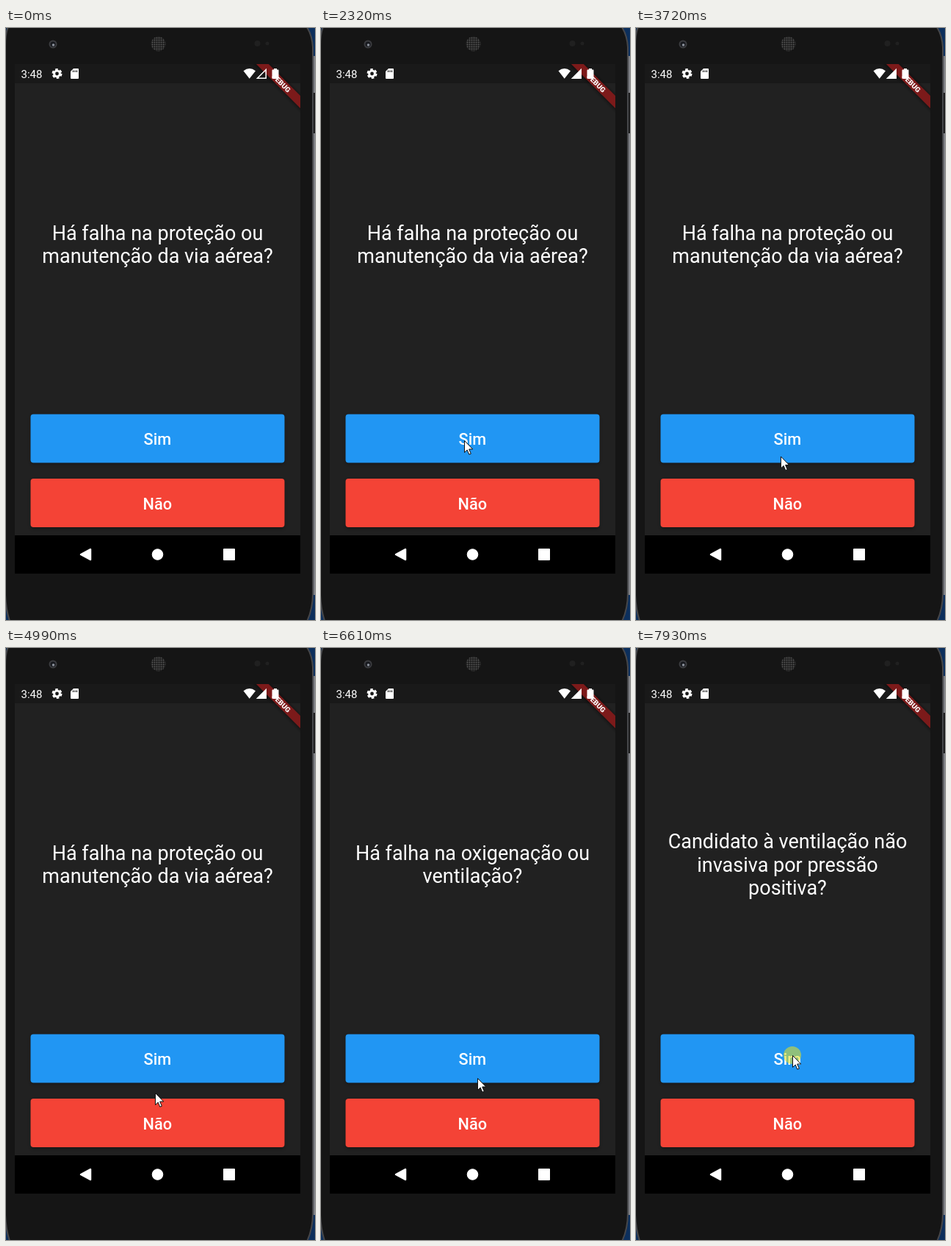
Write an HTML page that moves like this. It is 421x804 px and loops after 8 s.

```html
<!DOCTYPE html>
<html lang="pt">
<head>
<meta charset="utf-8">
<title>Triagem</title>
<style>
  html, body { margin: 0; width: 100%; height: 100%; overflow: hidden; background: #0c2f5c; }
  svg { display: block; width: 421px; height: 804px; }
  text { font-family: Roboto, Inter, sans-serif; fill: #fff; }
  .mid { text-anchor: middle; }
  .ask { font-size: 27px; }
  .label { font-size: 21.7px; font-weight: 500; }
</style>
</head>
<body>
<svg viewBox="0 0 421 804" xmlns="http://www.w3.org/2000/svg">
  <defs>
    <clipPath id="screen"><rect x="12" y="49" width="389" height="692"/></clipPath>
    <clipPath id="noClip"><rect x="34" y="612" width="345" height="66" rx="4"/></clipPath>
    <pattern id="mesh" width="3" height="3" patternUnits="userSpaceOnUse">
      <rect width="3" height="3" fill="#1b1b1b"/><circle cx="1.5" cy="1.5" r="1" fill="#565656"/>
    </pattern>
    <filter id="soft" x="-20%" y="-20%" width="140%" height="150%"><feGaussianBlur stdDeviation="2"/></filter>
  </defs>

  <!-- phone body -->
  <path d="M419 38h2v732h-2z" fill="#7d7f84"/>
  <path d="M418.5 88h2.5v55h-2.5z" fill="#1c1c1e"/>
  <path d="M4 -4Q-1 6 -1 24V770Q0 792 6 808H409Q418 790 418 768V26Q417 8 408 -4Z" fill="#151515" stroke="#46474a" stroke-width="2"/>
  <circle cx="64" cy="22" r="5.5" fill="#3c3d40"/>
  <circle cx="64" cy="22" r="3.6" fill="#17191e"/>
  <circle cx="64.5" cy="23" r="1.8" fill="#8d929c"/>
  <circle cx="207.500" cy="21.500" r="10" fill="url(#mesh)"/>
  <circle cx="342.500" cy="21" r="4" fill="#202020"/>
  <circle cx="356" cy="21" r="2.500" fill="#202020"/>

  <!-- app -->
  <g clip-path="url(#screen)">
    <rect x="12" y="49" width="389" height="692" fill="#212121"/>
    <rect x="12" y="49" width="389" height="26" fill="#191919"/>
    <rect x="12" y="689" width="389" height="52"/>
    <g transform="translate(375.200 74.800) rotate(45)">
      <rect x="-60" y="-6" width="120" height="13" opacity=".5" filter="url(#soft)"/>
      <rect x="-60" y="-6" width="120" height="12" fill="#7c1a1a"/>
      <text class="mid" y="3.500" font-size="9.700" font-weight="900">DEBUG</text>
    </g>
  </g>

  <!-- status icons -->
  <text x="20.500" y="68" font-size="15">3:48</text>
  <g fill="none" stroke="#fff">
    <circle cx="69.500" cy="62" r="3.900" stroke-width="3"/>
    <circle cx="69.500" cy="62" r="5.900" stroke-width="2.200" stroke-dasharray="3.500 2.680"/>
  </g>
  <path d="M92 55h6q1 0 1 1v12q0 1-1 1h-9q-1 0-1-1v-9z" fill="#fff"/>
  <path d="M91.500 57.500v2.500M94 57.500v2.500M96.500 57.500v2.500" stroke="#191919" stroke-width="1.200"/>
  <path d="M323.500 58.300Q331.700 51.700 340 58.300L331.700 68.800Z" fill="#fff"/>
  <path id="signal" d="M354.200 56.500V68.200H342.500Z" stroke="#fff" stroke-width="1.500"/>
  <path d="M365 55h4v1.500h1.500q1 0 1 1v10.500q0 1-1 1h-7q-1 0-1-1v-10.500q0-1 1-1h1.500z" fill="#fff"/>

  <!-- navigation -->
  <g fill="#fff" stroke="#fff" stroke-linejoin="round">
    <path d="M102 715L115 708V722Z" stroke-width="2.500"/>
    <circle cx="206.500" cy="715" r="7.300"/>
    <rect x="297" y="708" width="14" height="14" stroke-width="2"/>
  </g>

  <g id="ask"></g>

  <rect x="34" y="526" width="345" height="66" rx="4" opacity=".35" filter="url(#soft)"/>
  <rect x="33.500" y="524.500" width="346" height="66" rx="4" fill="#2196f3"/>
  <text id="yes" class="mid label" x="206.300" y="566"></text>

  <g id="no">
    <rect x="34" y="614" width="345" height="66" rx="4" opacity=".35" filter="url(#soft)"/>
    <rect x="33.500" y="612" width="346" height="66" rx="4" fill="#f44336"/>
    <g id="ink" clip-path="url(#noClip)" fill="#2196f3">
      <rect x="34" y="612" width="345" height="66" opacity=".045"/>
      <circle id="wave" cx="216" cy="648" opacity=".12"/>
    </g>
    <text class="mid label" x="206.300" y="654">Não</text>
  </g>

  <circle id="tap" r="12" fill="#e6e11e" opacity=".56"/>
  <path id="arrow" d="M.5 .5V16.500L4.200 13L6.800 19.200L9.300 18.200L6.700 12H11.700Z" fill="#fff" stroke="#111" stroke-width="1"/>
</svg>

<script>
const LOOP = 8000;
const $ = id => document.getElementById(id);

const first = { ask: ["Há falha na proteção ou", "manutenção da via aérea?"], yes: "Sim", no: true };
const pages = [
  [0, first],
  [2540, { ask: ["Intubar."], yes: "Reiniciar", no: false }],
  [3240, first],
  [6210, { ask: ["Há falha na oxigenação ou", "ventilação?"], yes: "Sim", no: true }],
  [7490, { ask: ["Candidato à ventilação não", "invasiva por pressão", "positiva?"], yes: "Sim", no: true }]
];

// start, end, jumps, x, y
const moves = [
  [110, 830, 11, 195, 560],
  [3720, 3860, 3, 199, 605],
  [4060, 4200, 3, 199, 582],
  [4990, 4991, 1, 203, 604],
  [5060, 5400, 6, 216.5, 646],
  [6410, 6610, 4, 213, 584],
  [6680, 6890, 4, 213, 553]
];

const taps = [[2110, 2250], [3020, 3110], [5860, 6130], [7140, 7280], [7930, LOOP]];

const ease = p => 1 - Math.pow(1 - p, 1.6);
const clamp = p => Math.max(0, Math.min(1, p));

function pointer(t) {
  let x = 380, y = 841;
  for (const [from, to, n, nx, ny] of moves) {
    if (t < from) break;
    const jump = Math.floor((t - from) / (to - from) * (n - 1) + 1e-6) + 1;
    const p = ease(Math.min(1, jump / n));
    x += (nx - x) * p;
    y += (ny - y) * p;
  }
  return [x, y];
}

let shown = null;
function showPage(page) {
  if (page === shown) return;
  shown = page;
  const n = page.ask.length;
  $("ask").innerHTML = page.ask.map((line, i) =>
    `<text class="mid ask" x="206.5" y="${303.5 + (i - (n - 1) / 2) * 31.5}">${line}</text>`).join("");
  $("yes").textContent = page.yes;
  $("no").style.display = page.no ? "" : "none";
}

function drawInk(t) {
  const on = t >= 5920 && t < 6480;
  $("ink").style.display = on ? "" : "none";
  if (!on) return;
  const r = t < 6130 ? 22 + (t - 5920) * 0.42 : 110 + (t - 6130) * 0.6;
  $("wave").setAttribute("r", r);
  $("ink").setAttribute("opacity", 1 - clamp((t - 6210) / 270));
}

function draw(t) {
  showPage(pages.filter(p => p[0] <= t).pop()[1]);
  $("signal").setAttribute("fill", t >= 1710 ? "#fff" : "none");
  drawInk(t);
  const [x, y] = pointer(t);
  const tapping = taps.some(([a, b]) => t >= a && t < b);
  $("tap").style.display = tapping ? "" : "none";
  $("tap").setAttribute("cx", x);
  $("tap").setAttribute("cy", y);
  $("arrow").setAttribute("transform", `translate(${x} ${y})`);
}

const start = performance.now();
function tick() {
  draw((performance.now() - start) % LOOP);
  requestAnimationFrame(tick);
}
tick();
</script>
</body>
</html>
```
